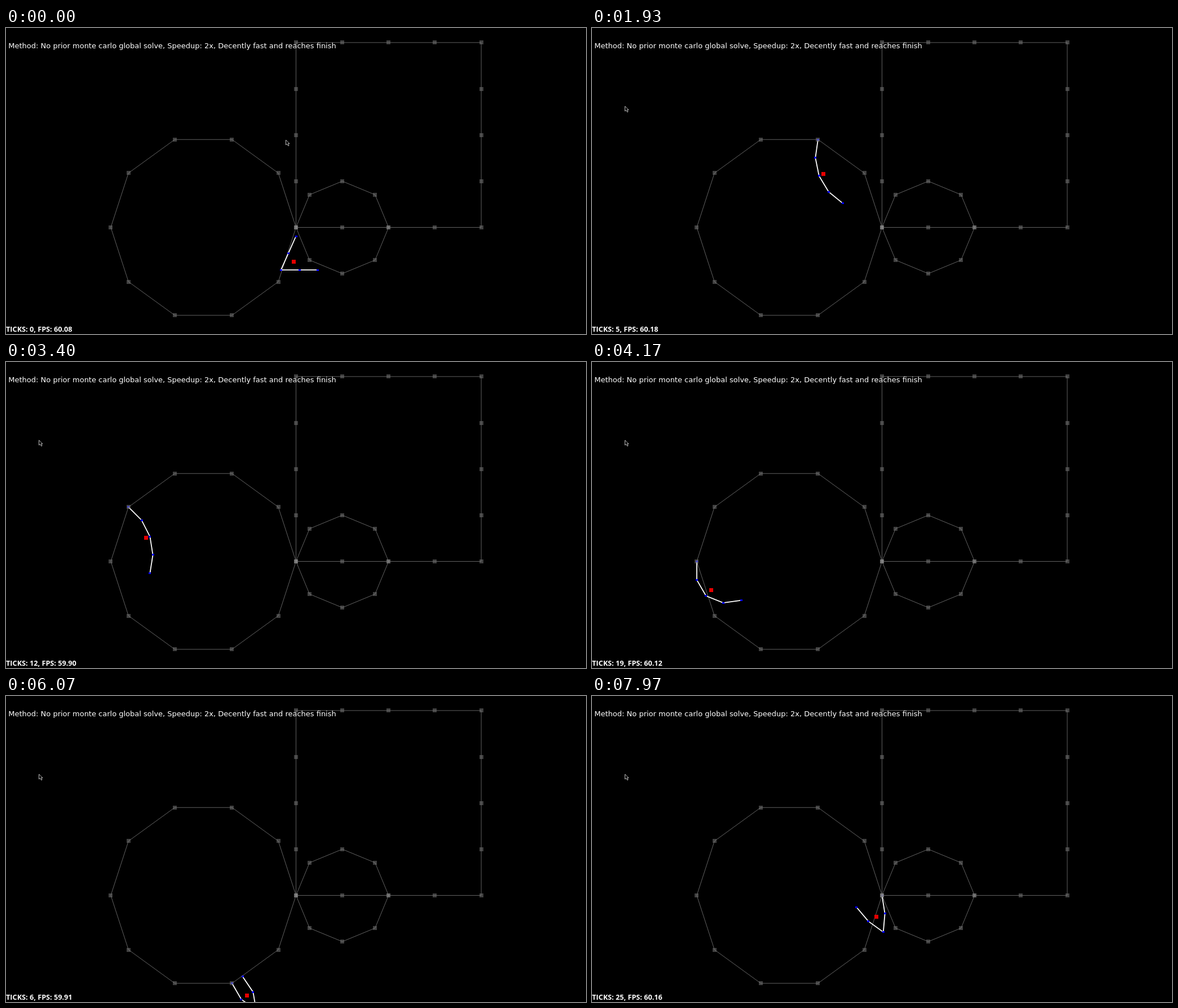
Recreate the animation shown at these times as an HTML page with a canvas. Size 1029 by 544 pixels, loop 8 s.

```html
<!DOCTYPE html>
<html lang="en">
<head>
<meta charset="utf-8">
<title>Climbing arm</title>
<style>
html, body { margin: 0; width: 100%; height: 100%; overflow: hidden; background: #000; }
canvas { display: block; }
</style>
</head>
<body>
<canvas id="stage" width="1029" height="544"></canvas>
<script>
const ctx = document.getElementById('stage').getContext('2d');
const DURATION = 8000, STEPS = 240;
const X = 514.5, Y = 354.5, R = 164.3;
const LINK = R / 5, RAD = Math.PI / 180;

const ring = (cx, r, n) => Array.from({ length: n + 1 }, (_, i) => {
  const a = -2 * Math.PI * i / n;
  return [cx + r * Math.cos(a), Y + r * Math.sin(a)];
});
const clamp = v => Math.max(0, Math.min(1, v));
const square = Array.from({ length: 17 }, (_, i) => {
  const edge = k => clamp(Math.min(i - k, 12 + k - i) / 4);
  return [X + 2 * R * edge(4), Y - 2 * R * edge(0)];
});
const decagon = ring(X - R, R, 10);
const octagon = ring(X + R / 2, R / 2, 8);

// Steps at which the arm takes hold of each decagon corner in turn.
const grabs = [0, 8, 53, 75, 90, 106, 132, 143, 176, 195, 214, STEPS - 1];

// A folded arm: directions of the upper and lower half, each bent a little.
const fold = (upper, lower, bend) => [upper + bend, upper - bend, lower + bend, lower - bend];
const swings = [
  [0, fold(114, 0, 0)],
  [37, fold(99, -50, 9)],
  [80, fold(58, -43, 8)],
  [125, fold(75, 7, 15)],
  [155, fold(91, 86, 1)],
  [182, fold(48, -112, 12)],
  [STEPS - 1, fold(88, 223, -7)]
];

// An arm sagging between corners n - 1 and n, seen from either end.
function span(n, reversed) {
  const side = n < 6 ? -1 : 1, heading = 288 - 36 * n;
  return [54, 18, -18, -54].map(d => reversed ? heading + side * (180 - d) : heading + side * d);
}

function anglesAt(step, leg) {
  const start = grabs[leg], end = grabs[leg + 1];
  const keys = swings.filter(([s]) => s >= start && s <= end);
  if (leg > 0) keys.unshift([start, span(leg, true)]);
  if (end < STEPS - 1) keys.push([end, span(leg + 1, false)]);
  const next = Math.max(1, keys.findIndex(([s]) => s >= step));
  const [t0, from] = keys[next - 1], [t1, to] = keys[next];
  const k = (step - t0) / (t1 - t0);
  return from.map((a, i) => a + (to[i] - a) * k);
}

function armAt(step, leg) {
  let [x, y] = decagon[leg];
  if (leg === 0) y += 15.5 * (1 - step / grabs[1]);
  const joints = [[x, y]];
  for (const a of anglesAt(step, leg)) {
    x += LINK * Math.cos(a * RAD);
    y += LINK * Math.sin(a * RAD);
    joints.push([x, y]);
  }
  return joints;
}

function polyline(points, color, width) {
  ctx.beginPath();
  points.forEach(p => ctx.lineTo(...p));
  ctx.strokeStyle = color;
  ctx.lineWidth = width;
  ctx.stroke();
}

function box([x, y], w, h, color) {
  ctx.fillStyle = color;
  ctx.fillRect(Math.round(x - w / 2), Math.round(y - h / 2), w, h);
}

function text(str, x, y, font) {
  ctx.font = font;
  ctx.fillStyle = '#fff';
  ctx.fillText(str, x, y);
}

// The pointer moves away quickly, overshoots and settles.
function drawCursor(step) {
  const k = Math.exp(-step / 6) * Math.cos(step / 6);
  ctx.save();
  ctx.translate(58.5 + 438 * k, 139 + 60 * k);
  const arrow = new Path2D('M0 0V9L2 7L4 10.5L5.5 10L4 6.5H6.5Z');
  ctx.fillStyle = '#000';
  ctx.fill(arrow);
  ctx.strokeStyle = '#bbb';
  ctx.lineWidth = 1;
  ctx.stroke(arrow);
  ctx.restore();
}

function draw(step) {
  const leg = grabs.findLastIndex((g, i) => i < 11 && step >= g);
  ctx.fillStyle = '#000';
  ctx.fillRect(0, 0, 1029, 544);

  text('Method: No prior monte carlo global solve, Speedup: 2x, Decently fast and reaches finish',
    4.3, 36, '13px "DejaVu Sans", sans-serif');

  const joints = armAt(step, leg);
  polyline(joints, '#fff', 1.8);
  joints.forEach(p => box(p, 4, 3, '#00f'));

  for (const shape of [decagon, square, octagon]) {
    polyline(shape, 'rgba(255,255,255,.38)', 1);
    shape.slice(1).forEach(p => box(p, 7, 7, 'rgba(128,128,128,.5)'));
  }

  const center = [0, 1].map(k =>
    joints.reduce((sum, p, i) => sum + p[k] * (i % 4 ? 1 : 0.5), 0) / 4);
  box(center, 7, 7, '#e60000');

  const ticks = leg ? step - grabs[leg] : 0;
  const fps = 60.08 + 0.2 * Math.sin(1.3 * leg);
  text(`TICKS: ${ticks}, FPS: ${fps.toFixed(2)}`, 0, 540, '700 12.7px "Open Sans", sans-serif');
  drawCursor(step);
}

function tick() {
  const t = performance.now() % DURATION;
  draw(Math.min(STEPS - 1, Math.floor((t + 5) * STEPS / DURATION)));
  requestAnimationFrame(tick);
}
tick();
</script>
</body>
</html>
```
